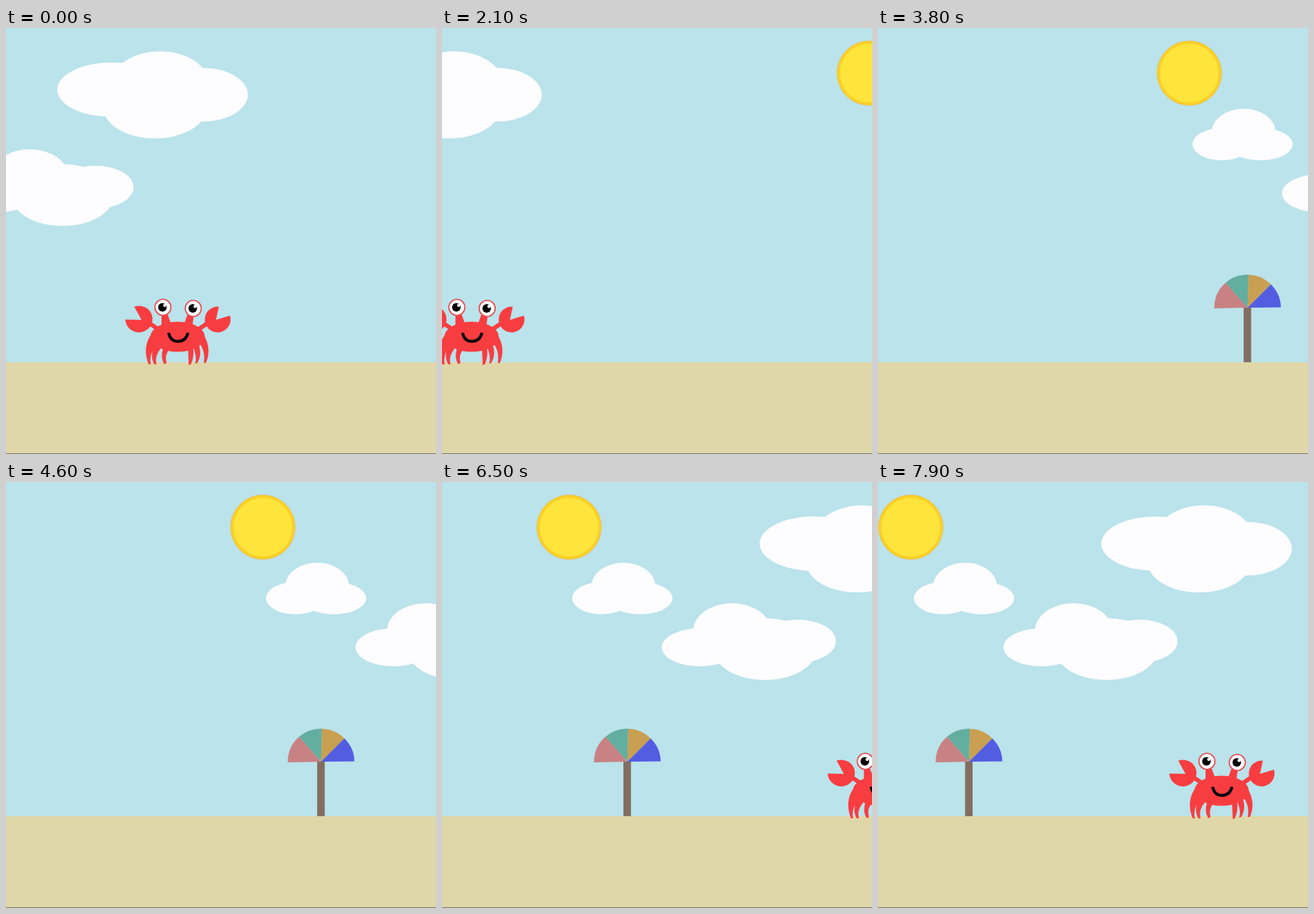
Animation, 600 px wide and 594 px high, one loop 8 s. Source, as an HTML page:

```html
<!DOCTYPE html>
<html lang="en">
<head>
<meta charset="utf-8">
<title>Beach</title>
<style>
html, body { margin: 0; width: 100%; height: 100%; overflow: hidden; background: #bae3eb; }
svg { display: block; width: 100%; height: 100%; }
.cloud { fill: #fdfcff; }
.crab { fill: #f83d41; }
</style>
</head>
<body>
<svg viewBox="0 0 600 594">
  <rect width="600" height="594" fill="#bae3eb"/>
  <rect y="466" width="600" height="128" fill="#dfd7a8"/>
  <rect y="593" width="600" height="1" fill="#77756a"/>

  <g id="sunny">
    <circle cx="45.7" cy="63" r="45" fill="#fad026" stroke="#e9c266"/>
    <circle cx="45.7" cy="63" r="41" fill="#fee43b"/>
    <g class="cloud">
      <ellipse cx="91" cy="162" rx="41" ry="22.5"/>
      <ellipse cx="121.5" cy="145" rx="44.5" ry="32.5"/>
      <ellipse cx="145" cy="162" rx="45" ry="22.5"/>
    </g>
    <rect x="121.5" y="389" width="10.5" height="77" fill="#836d60"/>
    <path d="M127 390 80.5 391A46.5 46.5 0 0 1 96.5 355Z" fill="#c88284"/>
    <path d="M127 390 96.5 355A46.5 46.5 0 0 1 128.3 344Z" fill="#62ae9f"/>
    <path d="M127 390 128.3 344A46.5 46.5 0 0 1 159.5 357.5Z" fill="#c99f51"/>
    <path d="M127 390 159.5 357.5A46.5 46.5 0 0 1 173.5 389.5Z" fill="#535de1"/>
  </g>

  <g id="crabby">
    <g class="cloud">
      <ellipse cx="147" cy="86" rx="75.5" ry="38"/>
      <ellipse cx="215" cy="78" rx="68" ry="45.5"/>
      <ellipse cx="208" cy="111" rx="72" ry="43"/>
      <ellipse cx="274" cy="93" rx="63.5" ry="37.5"/>
      <ellipse cx="-12" cy="230.5" rx="53" ry="26.5"/>
      <ellipse cx="33" cy="207" rx="54" ry="38"/>
      <ellipse cx="79" cy="233" rx="72" ry="43"/>
      <ellipse cx="125" cy="222" rx="53" ry="30"/>
    </g>
    <g class="crab">
      <path d="M202 428Q190 446 199 469L202 469Q199 453 211 444Z"/>
      <path d="M208 442Q200 457 207 469L210 469Q207 457 216 447Z"/>
      <path d="M219 447Q215 460 221 469L224 467Q221 456 228 448Z"/>
      <path d="M254 447 255 470 258 469Q263 458 261 446Z"/>
      <path d="M261 445Q267 458 264 468L267 467Q274 456 269 441Z"/>
      <path d="M268 437Q279 450 276 467L279 467Q287 448 277 430Z"/>
      <ellipse cx="239.5" cy="430.5" rx="38" ry="21"/>
      <path d="M217 398 225 398 231 414 217 416ZM253 400 262 402 260 415 248 414Z"/>
      <path d="M199 411 214 421M282 411 266 422" stroke="#f83d41" stroke-width="6"/>
      <path d="M189 407 166.5 406.5A19 18.5 0 1 0 179 388.5Z"/>
      <path d="M293 407 312.5 401A18 18 0 1 1 297 388.5Z"/>
    </g>
    <path d="M227 425Q229 437 240 437T254 425" fill="none" stroke="#080406" stroke-width="4"/>
    <g id="eye">
      <circle cx="219" cy="389.5" r="11.2" fill="#fff" stroke="#e8474c" stroke-width="1.6"/>
      <circle cx="218.3" cy="389.5" r="6" fill="#080406"/>
      <circle cx="221.5" cy="386.8" r="2.2" fill="#fff"/>
    </g>
    <use href="#eye" x="42.3" y="1.5"/>
  </g>
  <use href="#crabby" x="988.7"/>
</svg>
<script>
const LOOP = 8000, STEP = 100, SUN_X = 748.7, SUN_IN = 2100;
// [ms, px scrolled]; nearly constant speed
const path = [[0, 0], [900, 83.5], [1300, 122], [3000, 284], [4600, 436],
              [5800, 550], [7100, 674.5], [7900, 748.7]];
const sunny = document.getElementById('sunny');
const crabby = document.getElementById('crabby');
const moveX = (el, x) => el.setAttribute('transform', `translate(${x} 0)`);

function scrollAt(t) {
  const i = Math.max(1, path.findIndex(([end]) => end >= t));
  const [t0, x0] = path[i - 1], [t1, x1] = path[i];
  return x0 + (x1 - x0) * (t - t0) / (t1 - t0);
}

function draw() {
  const t = Math.floor((performance.now() - start) % LOOP / STEP) * STEP;
  const x = scrollAt(t);
  moveX(crabby, -x); // its second copy follows along
  moveX(sunny, SUN_X - x);
  sunny.setAttribute('visibility', t < SUN_IN ? 'hidden' : 'visible');
  requestAnimationFrame(draw);
}
const start = performance.now();
draw();
</script>
</body>
</html>
```
